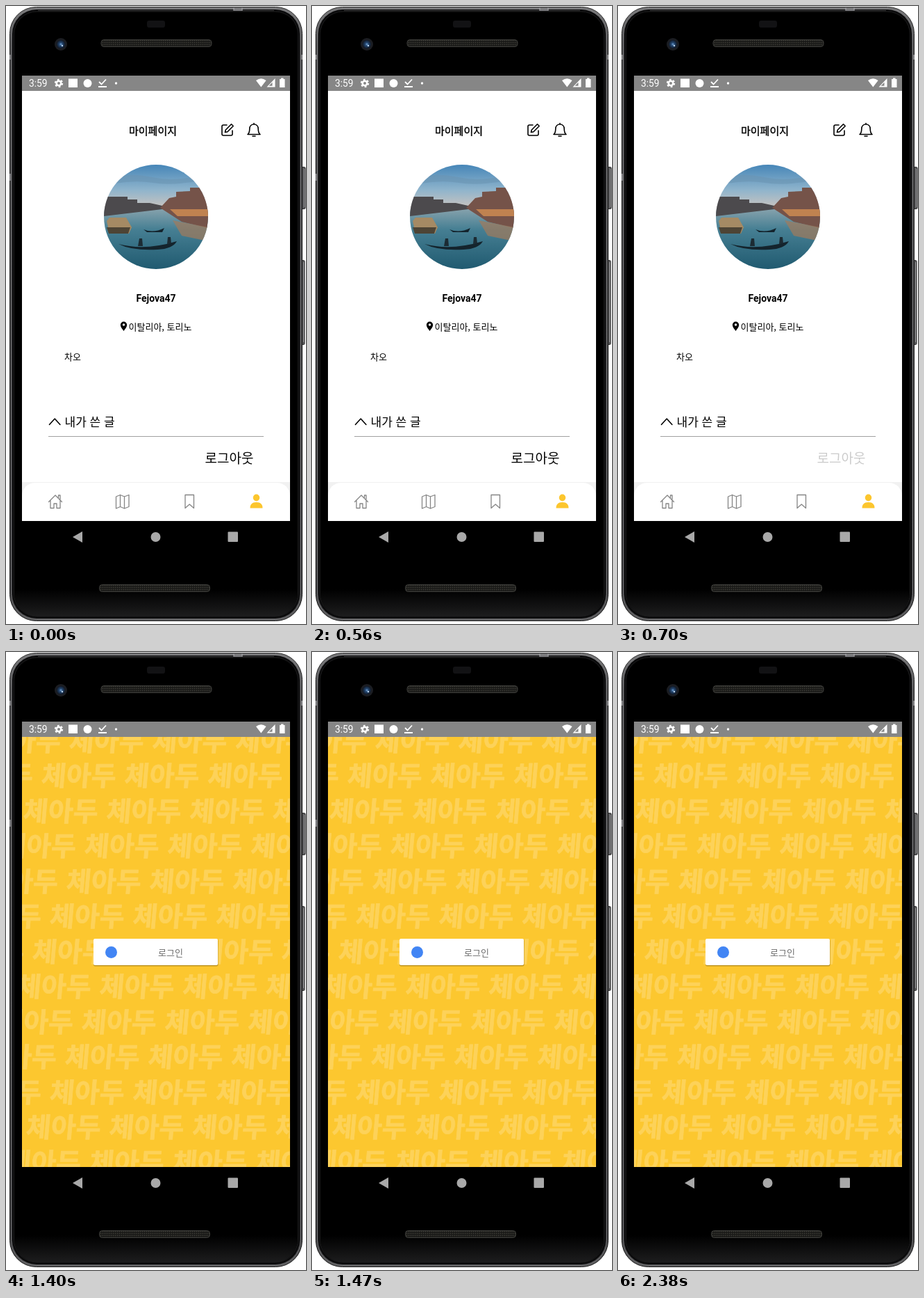
Write an HTML page that moves like this. It is 432 by 888 pixels and loops after 2.66 s.

```html
<!DOCTYPE html>
<html lang="ko">
<head>
<meta charset="utf-8">
<title>Log out</title>
<style>
  html, body { margin: 0; width: 100%; height: 100%; overflow: hidden; background: #fff; }
  svg { display: block; width: 432px; height: 888px; }
  text { font-family: "Noto Sans CJK KR", "Noto Sans CJK", "Noto Sans KR", sans-serif; }
  .latin { font-family: Roboto, sans-serif; }
  .thin { font-weight: 350; }
  .mid { text-anchor: middle; }
  .line { fill: none; stroke-linecap: round; stroke-linejoin: round; }
  #words { font-size: 39px; font-weight: 900; fill: #fdd259; stroke: #fdd259; stroke-width: .8; stroke-linejoin: round; }
  #logout { animation: press 2660ms step-end infinite; }
  #login { visibility: hidden; animation: login 2660ms step-end infinite; }
  @keyframes press { 0% { opacity: 1; } 26.315% { opacity: .2; } }
  @keyframes login { 0% { visibility: hidden; } 34.21% { visibility: visible; } }
</style>
</head>
<body>
<svg viewBox="0 0 432 888" xmlns="http://www.w3.org/2000/svg">
  <defs>
    <linearGradient id="rim" x2="0" y2="1">
      <stop offset="0" stop-color="#858587"/>
      <stop offset=".06" stop-color="#4b4b4d"/>
      <stop offset=".5" stop-color="#3c3c3e"/>
      <stop offset=".95" stop-color="#333335"/>
      <stop offset="1" stop-color="#58585a"/>
    </linearGradient>
    <linearGradient id="chin" x2="0" y2="1">
      <stop offset="0" stop-color="#000"/>
      <stop offset="1" stop-color="#1d1d1e"/>
    </linearGradient>
    <linearGradient id="sky" x2="0" y2="1">
      <stop offset="0" stop-color="#4686b8"/>
      <stop offset=".55" stop-color="#8fb4cc"/>
      <stop offset="1" stop-color="#d3c6bd"/>
    </linearGradient>
    <linearGradient id="water" x2="0" y2="1">
      <stop offset="0" stop-color="#8aa4ae"/>
      <stop offset=".35" stop-color="#467f93"/>
      <stop offset="1" stop-color="#205a70"/>
    </linearGradient>
    <radialGradient id="lens">
      <stop offset="0" stop-color="#6f9fd0"/>
      <stop offset=".4" stop-color="#24466f"/>
      <stop offset="1" stop-color="#101a2a"/>
    </radialGradient>
    <pattern id="mesh" width="3" height="3" patternUnits="userSpaceOnUse">
      <rect width="3" height="3" fill="#1b1b19"/>
      <circle cx="1.5" cy="1.5" r=".8" fill="#403f39"/>
    </pattern>
    <clipPath id="avatar"><circle cx="216" cy="303" r="75"/></clipPath>
    <clipPath id="page"><rect x="23" y="122" width="386" height="618"/></clipPath>
  </defs>

  <!-- phone body -->
  <g fill="#59595b" stroke="#2a2a2b">
    <rect x="424.500" y="231.500" width="6.500" height="60" rx="1.500"/>
    <rect x="424.500" y="365.500" width="5.500" height="121" rx="1.500"/>
  </g>
  <path d="M429.500 234v55M428.500 368v115" stroke="#99999b"/>
  <rect x="5.500" y="1.500" width="421" height="882" rx="38" fill="url(#rim)" stroke="#222"/>
  <rect x="7.500" y="3.500" width="417" height="878" rx="36" fill="none" stroke="#6e6e70"/>
  <rect x="9" y="5" width="414" height="875" rx="35" fill="#0b0b0c"/>
  <rect x="11.500" y="8" width="409" height="869" rx="33" fill="#000" stroke="#1c1c1d"/>
  <path d="M12 838H420V844a33 33 0 0 1-33 33H45a33 33 0 0 1-33-33Z" fill="url(#chin)"/>
  <path d="M46 6.500H386" stroke="#39393b"/>
  <path d="M6 70v7M426 70v7M6 241v10M328 2v4h12v-4" fill="none" stroke="#97979a" stroke-width="1.500"/>
  <rect x="203" y="21" width="26" height="10" rx="3" fill="#121214"/>
  <g fill="url(#mesh)" stroke="#3f3f3c">
    <rect x="137" y="48.500" width="159" height="10" rx="4"/>
    <rect x="134.500" y="831.500" width="159" height="10" rx="4"/>
  </g>
  <circle cx="79" cy="55" r="9" fill="#1b1d22"/>
  <circle cx="79" cy="55" r="6" fill="url(#lens)"/>
  <circle cx="81" cy="57" r="1.200" fill="#bcd6ee"/>

  <!-- profile page -->
  <rect x="23" y="122" width="386" height="618" fill="#fff"/>
  <text class="mid" x="211.500" y="184.500" font-size="15" stroke="#000" stroke-width=".4">마이페이지</text>
  <g class="line" stroke="#000" stroke-width="1.600">
    <path d="M318 171h-5a2 2 0 0 0-2 2v11a2 2 0 0 0 2 2h11a2 2 0 0 0 2-2v-5"/>
    <path d="M324.500 169.800l2.700 2.700-8.200 8.200-3.500.8.800-3.500Z"/>
    <path d="M348 184.500c2.500-2 2.800-4 2.800-8 0-4 2.500-6.500 6.200-6.500s6.200 2.500 6.200 6.500c0 4 .3 6 2.800 8ZM357 168.500v1M355 187h4"/>
    <path d="M62.500 601.500l7.700-8.500 7.700 8.500"/>
  </g>

  <g clip-path="url(#avatar)">
    <rect x="141" y="228" width="150" height="66" fill="url(#sky)"/>
    <path d="M141 248q35-10 70-2t80-6v9q-50 10-80 5t-70 4Z" fill="#6b95b3" opacity=".6"/>
    <rect x="141" y="290" width="150" height="88" fill="url(#water)"/>
    <path d="M141 274h34v4h14v5h18l18 4v5l-84 10Z" fill="#4c4a4d"/>
    <path d="M222 290l13-14 10-2v-7l20-1v-5h26v58l-38-9Z" fill="#755349"/>
    <path d="M236 292h55v10h-44Z" fill="#c08250"/>
    <path d="M240 308l51 10v20l-38-8Z" fill="#a37b5c" opacity=".7"/>
    <path d="M145 309l4-5h24l8 14-4 9h-28Z" fill="#a58a64"/>
    <path d="M145 318h34l-3 9h-28Z" fill="#4d4435"/>
    <path d="M198 321q14 6 30-2l-3 6h-22ZM162 342q38 10 84-4-6 11-28 12-36 2-56-8Z" fill="#14242d"/>
    <path d="M190 345l2-11h4l1 11M232 342l1-10h4l1 9" fill="#1c2b33"/>
  </g>

  <text class="latin mid" x="216" y="425" font-size="14" font-weight="700">Fejova47</text>
  <path d="M169.500 467c-2-3-4.700-5.800-4.700-8.800a4.700 4.700 0 0 1 9.400 0c0 3-2.700 5.800-4.700 8.800Z"/>
  <circle cx="169.500" cy="458" r="1.700" fill="#fff"/>
  <text class="thin" x="176.500" y="465.500" font-size="13">이탈리아, 토리노</text>
  <text class="thin" x="84" y="508.500" font-size="13">차오</text>
  <text class="thin" x="84.500" y="603.500" font-size="17">내가 쓴 글</text>
  <path d="M61 618.500H371" stroke="#a0a0a0"/>
  <text id="logout" class="thin" x="286.500" y="657" font-size="19">로그아웃</text>

  <rect x="23" y="684" width="386" height="56" fill="#f1f1f1"/>
  <path d="M23 740V704a19 19 0 0 1 19-19H390a19 19 0 0 1 19 19V740Z" fill="#fff"/>
  <g class="line" stroke="#858585" stroke-width="1.300">
    <path d="M61.500 712.500l9.500-9.500 9.500 9.500M64 711v10.500h5v-6.500h4v6.500h5V711M75.500 706.500v-3.500h2.500v6"/>
    <path d="M158.500 705l6-2.500 6 2.500 6.500-2.500v17l-6.500 2.500-6-2.500-6 2.500ZM164.500 702.500v17M170.500 705v17"/>
    <path d="M258 702.500h12.500v19l-6.250-5.500-6.250 5.500Z"/>
  </g>
  <g fill="#fcc62e">
    <ellipse cx="360.500" cy="706.500" rx="4.700" ry="5"/>
    <path d="M351.500 721.500c0-5.500 3-8.500 9-8.500s9 3 9 8.500Z"/>
  </g>

  <!-- login page -->
  <g id="login">
    <rect x="23" y="122" width="386" height="618" fill="#fcc72f"/>
    <g clip-path="url(#page)"><g id="words"></g></g>
    <rect x="126" y="413" width="179.500" height="38.500" rx="2" fill="#a98520" opacity=".75"/>
    <rect x="126" y="412" width="179" height="38" rx="2" fill="#fff"/>
    <circle cx="151.500" cy="431.500" r="8.500" fill="#4285f4"/>
    <text class="mid" x="237" y="436.500" font-size="13" fill="#6b6b6b">로그인</text>
  </g>

  <!-- system bars -->
  <rect x="23" y="100" width="386" height="22" fill="#868686"/>
  <g fill="#fff">
    <text class="latin" x="33" y="116" font-size="13.800">3:59</text>
    <circle cx="76" cy="111" r="3.300" fill="none" stroke="#fff" stroke-width="2.600"/>
    <circle cx="76" cy="111" r="5.200" fill="none" stroke="#fff" stroke-width="2" stroke-dasharray="2.700 2.745"/>
    <rect x="90" y="104.500" width="13" height="12.500"/>
    <circle cx="117.500" cy="111" r="6"/>
    <path d="M134 109l3.500 3.500 6.500-7M133 116h12" fill="none" stroke="#fff" stroke-width="1.800"/>
    <circle cx="158.500" cy="111" r="1.700"/>
    <path d="M360 107q7.300-5.600 14.600 0L367.300 116.500ZM387.500 104v12.500H375.500Z"/>
    <path d="M383.500 109.800v5h-5Z" fill="#868686"/>
    <path d="M394 105h2v-1.500h3.500V105h2v12H394Z"/>
  </g>
  <g fill="#a9a9a9">
    <path d="M96 763l14-8v16Z"/>
    <circle cx="215.500" cy="763" r="7"/>
    <rect x="319.500" y="755.500" width="14.500" height="14.500" rx="1"/>
  </g>
</svg>
<script>
  const words = document.getElementById('words');
  const starts = [90, 50, 24, 112, 86, 62, 37, 14, 108, 84, 62, 28, 119];
  const period = 119.7;

  starts.forEach((start, row) => {
    const y = 141.5 + row * 50.5;
    for (let x = start - period; x < 409; x += period) {
      const word = document.createElementNS('http://www.w3.org/2000/svg', 'text');
      word.setAttribute('transform', `translate(${x} ${y}) skewX(-5)`);
      word.textContent = '체아두';
      words.append(word);
    }
  });
</script>
</body>
</html>
```
